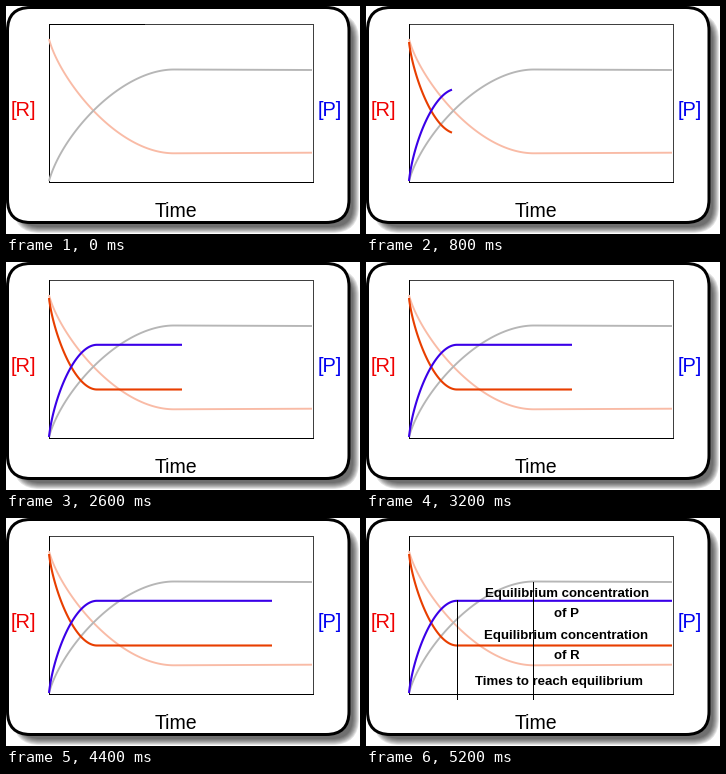
Animation of 354x228 px, one loop 5400 ms. Source, as a matplotlib script:

```python
import numpy as np
import matplotlib.pyplot as plt
from matplotlib.animation import FuncAnimation
from matplotlib.patches import FancyBboxPatch

W, H, DPI = 354, 228, 64
FRAMES, STEP_MS = 27, 200
PT = 72 / DPI

plt.rcParams["font.family"] = "Liberation Sans"
fig = plt.figure(figsize=(W / DPI, H / DPI), dpi=DPI, facecolor="white")
ax = fig.add_axes([0, 0, 1, 1])
ax.set(xlim=(0, W), ylim=(H, 0))
ax.axis("off")


def rounded(x0, y0, x1, y1, r, **style):
    box = FancyBboxPatch((x0, y0), x1 - x0, y1 - y0,
                         boxstyle=f"round,pad=0,rounding_size={r}", **style)
    ax.add_patch(box)


def line(xs, ys, color, width=1.0, **style):
    return ax.plot(xs, ys, color=color, lw=width * PT,
                   solid_capstyle="butt", **style)[0]


def hairline(xs, ys, color="black", **style):
    return line(xs, ys, color, antialiased=False, **style)


def label(x, y, text, size, color="black", **style):
    return ax.text(x, y, text, fontsize=size * PT, color=color,
                   va="baseline", **style)


def curve(start, c1, c2, knee, end):
    """Cubic arc from start to knee, then a straight run to end."""
    t = np.linspace(0, 1, 120)[:, None]
    p = [np.array(q, float) for q in (start, c1, c2, knee)]
    arc = ((1 - t) ** 3 * p[0] + 3 * t * (1 - t) ** 2 * p[1]
           + 3 * t ** 2 * (1 - t) * p[2] + t ** 3 * p[3])
    return np.vstack([arc, end]).T


def cut(path, x_end):
    x, y = path
    keep = x < x_end
    return np.append(x[keep], x_end), np.append(y[keep], np.interp(x_end, x, y))


# Card with soft shadow
for k in range(7):
    rounded(7 + k, 7 + k, 353 - k, 227 - k, 27 - k,
            fc="black", ec="none", alpha=0.11)
rounded(1.5, 1.5, 343, 216.5, 23, fc="white", ec="black", lw=3 * PT)

# Plot box
L, R, T, B = 42.5, 306.5, 17.5, 175.5
hairline([L, R], [T, T], "#404040")
hairline([R, R], [T, B], "#404040")
hairline([L, L], [T, B])
hairline([L, R], [B, B])
top_dark = hairline([L, 138], [T, T])

# Slow reaction
line(*curve((43, 33), (53, 72), (110, 147.3), (168, 147.3), (306, 146.7)),
     "#f9bba6", 1.9)
line(*curve((43, 175), (56, 128), (115, 63.5), (168, 63.5), (306, 64)),
     "#b6b6b6", 1.9)

# Fast reaction
reactant = curve((43, 36), (47, 70), (68, 127.5), (91, 127.5), (306, 127.5))
product = curve((43, 175), (47, 138), (68, 82.8), (91, 82.8), (306, 82.8))
r_line = line([], [], "#e83e00", 2.1)
p_line = line([], [], "#3a00e8", 2.1)

label(4.5, 110, "[R]", 20, "#f00000")
label(312, 110, "[P]", 20, "#0000f0")
label(149, 211, "Time", 19.5)

notes = [
    hairline([90.5, 90.5], [82, 181]),
    hairline([166.5, 166.5], [64, 181]),
]
for x, y, text in [(119, 79, "Equilibrium concentration"),
                   (188, 99, "of P"),
                   (118, 121, "Equilibrium concentration"),
                   (188, 141, "of R"),
                   (109, 167, "Times to reach equilibrium")]:
    notes.append(label(x, y, text, 13.3, weight="bold"))


def draw(i):
    top_dark.set_visible(i == 0)
    tip = min(46 + 10 * i, 286) if i < 25 else 306
    for ln, path in ((r_line, reactant), (p_line, product)):
        ln.set_visible(i > 0)
        ln.set_data(*cut(path, tip))
    for note in notes:
        note.set_visible(i == FRAMES - 1)
    return [top_dark, r_line, p_line, *notes]


anim = FuncAnimation(fig, draw, frames=FRAMES, interval=STEP_MS,
                     init_func=lambda: draw(0), repeat=True, repeat_delay=0)
plt.show()
```
